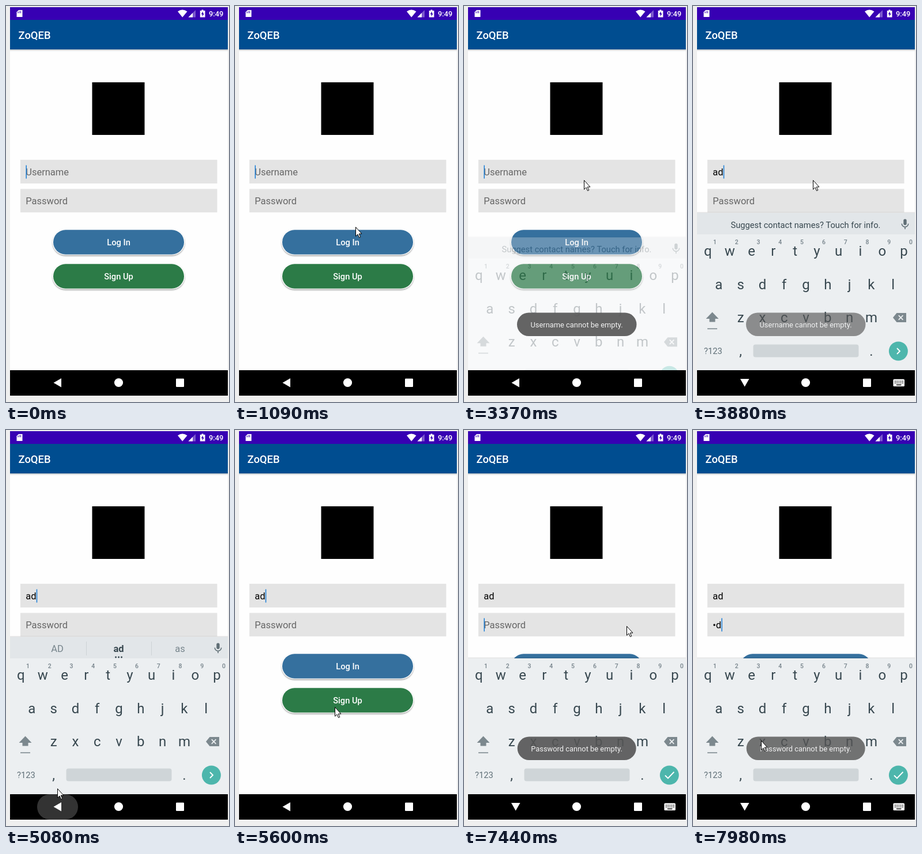
An HTML page for the animation above (8000 ms loop, 387 by 685 pixels).

```html
<!DOCTYPE html>
<html lang="en">
<head>
<meta charset="utf-8">
<title>Login screen</title>
<style>
html, body { margin: 0; width: 100%; height: 100%; overflow: hidden; background: #efefef; }
svg { display: block; width: 387px; height: 685px; }
text { font-family: Roboto, "Open Sans", sans-serif; font-size: 16.5px; }
.mid { text-anchor: middle; }
.med { font-weight: 500; fill: #fff; }
.hint { fill: #666; }
.key { font-size: 24px; fill: #37474f; text-anchor: middle; }
.num { font-size: 10.5px; font-weight: 500; fill: #75828a; text-anchor: middle; }
.btn { font-size: 14.7px; }
.toast rect { fill: #555; fill-opacity: .9; }
.toast text { font-size: 12.9px; fill: #f2f2f2; text-anchor: middle; }
.icon { fill: #7c888e; }
.white { fill: #fff; }
</style>
</head>
<body>
<svg viewBox="0 0 387 685">
  <defs>
    <clipPath id="area"><rect x="7" y="350" width="378" height="280"/></clipPath>
    <filter id="drop" x="-5%" y="-10%" width="110%" height="140%">
      <feDropShadow dx="0" dy="1.5" stdDeviation="1" flood-opacity=".4"/>
    </filter>
  </defs>

  <rect x="7" y="2" width="378" height="672" fill="#fefefe"/>
  <rect x="7" y="75" width="378" height="1.5" fill="#b8bec4"/>
  <rect x="7" y="76.5" width="378" height="1.5" fill="#e8eaec"/>
  <rect x="7" y="24" width="378" height="51" fill="#004d90"/>
  <rect x="7" y="2" width="378" height="22" fill="#3700b3"/>
  <text class="med" x="21.5" y="56.5" style="font-size:18.4px">ZoQEB</text>

  <!-- status bar -->
  <g class="white">
    <path d="M22 7H28.5V19H18.5V10.5Z"/>
    <path d="M298 9.5Q306 3.5 314.5 9.5L306.2 19.5Z"/>
    <path d="M329 7V19.5H316.5Z" opacity=".35"/>
    <path d="M324 12V19.5H316.5Z"/>
    <path d="M339.5 6.5H342.5V8H345.5V19.5H336.8V8H339.5Z"/>
    <path d="M342 9.5L338.6 14.3H340.7V18L343.8 13H342Z" fill="#3700b3"/>
  </g>
  <path d="M20.8 10v2.4M23.1 8.6v3.8M25.5 8.6v3.8" stroke="#3700b3"/>
  <text class="med" x="352" y="17.5" style="font-size:12.9px">9:49</text>

  <!-- form -->
  <rect x="149.5" y="132" width="91" height="91"/>
  <g fill="#e4e4e4">
    <rect x="25" y="266" width="341.5" height="41"/>
    <rect x="25" y="316.5" width="341.5" height="40.5"/>
  </g>
  <text id="user" x="34.2" y="292.7"></text>
  <text id="pass" x="34.2" y="342.7"></text>
  <rect id="caret" width="1.6" height="23" fill="#2583d8"/>
  <g filter="url(#drop)" fill="#fff">
    <rect x="80.8" y="386.2" width="229.4" height="44.6" rx="22.3"/>
    <rect x="80.8" y="445.2" width="229.4" height="44.6" rx="22.3"/>
  </g>
  <rect x="82" y="387.3" width="227" height="42.4" rx="21.2" fill="#35709e"/>
  <rect id="press" x="82" y="387.3" width="227" height="42.4" rx="21.2" fill="#fff"/>
  <rect x="82" y="446.3" width="227" height="42.4" rx="21.2" fill="#2c7b47"/>
  <text class="med mid btn" x="195.5" y="413.6">Log In</text>
  <text class="med mid btn" x="195.5" y="472.6">Sign Up</text>

  <!-- keyboard -->
  <g clip-path="url(#area)">
    <g id="board">
      <g id="strip">
        <rect x="7" y="356.5" width="378" height="2" opacity=".1"/>
        <rect x="7" y="358" width="378" height="37" fill="#e2e6e9"/>
        <text id="ask" class="mid" x="195.5" y="384" fill="#37474f" style="font-size:14.7px">Suggest contact names? Touch for info.</text>
        <g id="words" class="mid" fill="#77858c">
          <text x="89" y="384">AD</text>
          <text x="195.5" y="384" fill="#37474f" font-weight="700">ad</text>
          <text x="302" y="384">as</text>
          <path d="M139.5 366v24M252.5 366v24" stroke="#cdd3d6"/>
          <path d="M190.5 393h.1M195.5 393h.1M200.5 393h.1" stroke="#37474f" stroke-width="2.8" stroke-linecap="round"/>
        </g>
        <rect x="365.3" y="368.5" width="5.4" height="10.5" rx="2.7" fill="#5f6e75"/>
        <path d="M362.3 376.5a5.7 5.7 0 0 0 11.4 0M368 382v4" fill="none" stroke="#5f6e75" stroke-width="1.6"/>
      </g>
      <rect id="edge" x="7" y="393.5" width="378" height="2"/>
      <rect x="7" y="395" width="378" height="235" fill="#eceff1"/>
      <g id="keys"></g>
      <path class="icon" d="M33.5 529.5L44.5 541H38.5V546.5H28.5V541H22.5Z"/>
      <rect class="icon" x="25" y="557.5" width="17" height="1.6"/>
      <path class="icon" d="M353.5 531H370V547H353.5L347 539Z"/>
      <path d="M356.8 535.2l7.6 7.6m0-7.6l-7.6 7.6" stroke="#eceff1" stroke-width="1.8"/>
      <text x="19" y="602" fill="#607078" style="font-size:14.7px">?123</text>
      <text class="key" x="82.6" y="605">,</text>
      <text class="key" x="309.4" y="605">.</text>
      <rect x="104.5" y="585.5" width="183" height="22" rx="4" fill="#cfd5d8"/>
      <circle cx="356.4" cy="597" r="16.5" fill="#4db6ac"/>
      <path id="enter" fill="none" stroke="#fff" stroke-width="1.9"/>
    </g>
  </g>

  <!-- navigation bar -->
  <rect x="7" y="630" width="378" height="44"/>
  <rect id="ripple" x="54" y="630" width="71" height="44" rx="22" fill="#333"/>
  <g class="white">
    <path id="back"/>
    <circle cx="195.5" cy="651.5" r="7.6"/>
    <rect x="295" y="644.5" width="14" height="14.5" rx="1.2"/>
    <g id="imeIcon">
      <rect x="347.5" y="645.5" width="19.5" height="12.5" rx="1.5"/>
      <path d="M350 649h15M350 652h15" stroke="#000" stroke-width="1.6" stroke-dasharray="1.7 1.6"/>
      <path d="M353 655.4h8.5" stroke="#000" stroke-width="1.5"/>
    </g>
  </g>

  <g class="toast" id="userToast">
    <rect x="92" y="530.5" width="207.5" height="40.5" rx="20.2"/>
    <text x="195.5" y="556">Username cannot be empty.</text>
  </g>
  <g class="toast" id="passToast">
    <rect x="92.7" y="530.5" width="206" height="40.5" rx="20.2"/>
    <text x="195.5" y="556">Password cannot be empty.</text>
  </g>
  <path id="mouse" d="M.5 .5V16.2L4 12.9L6.5 18.6L8.8 17.6L6.3 12H11Z" fill="#fff" stroke="#000"/>
</svg>

<script>
const LOOP = 8000;
const STEP = 137.5; // screen refresh, ms
const LEFT = 34.2;  // text inset of the fields
const KEY = 37.8;   // key pitch

const $ = id => document.getElementById(id);
const set = (id, name, value) => $(id).setAttribute(name, value);
const show = (id, alpha) => set(id, "opacity", +alpha);

const ramp = (t, from, to) => Math.min(1, Math.max(0, (t - from) / (to - from)));
const pulse = (t, on, off, rise, fall) => ramp(t, on, on + rise) * (1 - ramp(t, off, off + fall));
const typed = (text, t, start, gap) => text.slice(0, Math.max(0, Math.ceil((t - start) / gap)));

// pointer glides: start, end, x, y; it rests in between
const glides = [
  [100, 1100, 209, 382], [1100, 1370, 206, 405],  // to Log In
  [1780, 2200, 363, 428], [2200, 2720, 208, 301], // round to the name field
  [4150, 4810, 91, 664], [4810, 5085, 88, 621],   // back key
  [5085, 5700, 214, 410],                         // Log In again
  [6180, 6460, 232, 431], [6460, 6990, 290, 330], // password field
  [7400, 7970, 118, 537]
];

function pointer(t) {
  let x = 300, y = 705;
  for (const [from, to, tx, ty] of glides) {
    const p = ramp(t, from, to);
    x += (tx - x) * p;
    y += (ty - y) * p;
  }
  return `translate(${Math.round(x)} ${Math.round(y)})`;
}

function field(id, text, hint) {
  $(id).textContent = text || hint;
  set(id, "class", text ? "" : "hint");
  return text ? $(id).getComputedTextLength() : 0;
}

function addKey(cls, x, y, label) {
  $("keys").insertAdjacentHTML("beforeend", `<text class="${cls}" x="${x}" y="${y}">${label}</text>`);
}
["qwertyuiop", "asdfghjkl", "zxcvbnm"].forEach((row, r) => {
  const indent = [0, .5, 1.5][r];
  [...row].forEach((c, i) => {
    const x = 25.9 + KEY * (i + indent);
    addKey("key", x, Math.round(432 + 57.6 * r), c);
    if (r === 0) addKey("num", x + 12, 411.5, (i + 1) % 10);
  });
});

function draw(t) {
  const inPass = t >= 7140;
  const code = typed("ad", t, 7500, 260).replace("ad", "•d");
  const nameWidth = field("user", typed("ad", t, 3500, 200), "Username");
  const codeWidth = field("pass", code, "Password");

  // the blink restarts with typing
  const lit = t < 3220 ? (t + 350) % 1000 < 500 : t < 4000 || inPass || t % 1000 < 540;
  set("caret", "x", LEFT + .2 + (inPass ? codeWidth : nameWidth));
  set("caret", "y", inPass ? 325.5 : 275.5);
  show("caret", lit);

  const up = pulse(t, 3220, 5090, 270, 230) + ramp(t, 7140, 7410);
  set("board", "transform", `translate(0 ${(1 - up) * 60})`);
  show("board", up);
  show("strip", !inPass);
  show("edge", inPass ? .1 : 0);
  show("ask", t < 4100);
  show("words", t >= 4100);
  set("enter", "d", inPass ? "M349 597.5L354 602.5L364.5 591.5" : "M354 592L359 597L354 602");

  const open = t > 3300 && t < 5080 || t > 7280;
  set("back", "d", open ? "M82 645H97.5L89.7 658.5Z" : "M82.5 651.7L96 644V659.5Z");
  show("imeIcon", open);

  show("ripple", pulse(t, 4810, 5090, 200, 380));
  show("press", .18 * (pulse(t, 1500, 1650, 140, 280) + pulse(t, 5900, 6050, 140, 280)));
  show("userToast", pulse(t, 1650, 3720, 300, 440));
  show("passToast", pulse(t, 6030, 7930, 300, 440));
  set("mouse", "transform", pointer(t));
}

function frame() {
  const t = performance.now() % LOOP;
  draw(Math.floor((t + STEP / 4) / STEP) * STEP);
  requestAnimationFrame(frame);
}
frame();
</script>
</body>
</html>
```
